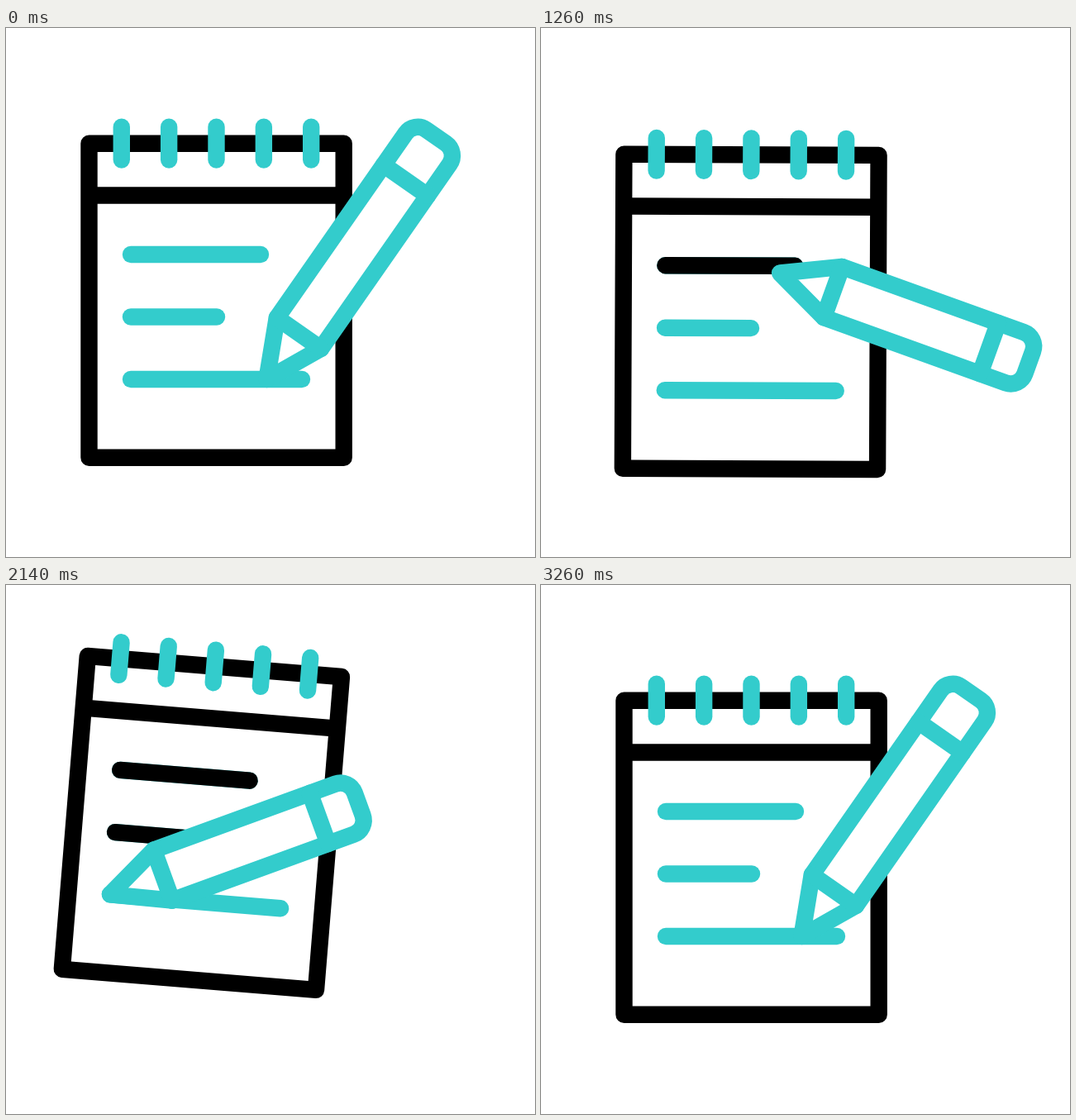
Write an HTML page with a canvas that moves like this. It is 640 by 640 pixels and loops after 3.56 s.

```html
<!DOCTYPE html>
<html lang="en">
<head>
<meta charset="utf-8">
<title>Notepad and pencil</title>
<style>
html, body { margin: 0; width: 100%; height: 100%; overflow: hidden; background: #fff; }
canvas { display: block; width: 100vw; height: 100vh; object-fit: contain; }
</style>
</head>
<body>
<canvas id="stage" width="640" height="640"></canvas>
<script>
const ctx = document.getElementById('stage').getContext('2d');
const LOOP = 3560, START = 212, REST = 3220;
const INK = '#000', TEAL = '#33cccc', RAD = Math.PI / 180;
const PIVOT = { x: 254.5, y: 112.5 }, LEFT = 151;

// The pencil writes each row from left to right, turning as it goes.
const rows = [
  { begin: 605, done: 1210, end: 308, lean: [31.5, 23.7] },
  { begin: 1450, done: 1725, end: 255, lean: [-10, -12.5] },
  { begin: 2145, done: 2711, end: 358, lean: [-20, -44.5] }
];
rows.forEach((row, i) => row.y = 274 + i * 75.5);

const rest = { x: 315.5, y: 425, lean: -55.1 };
const poses = [
  { t: START, ...rest },
  ...rows.flatMap(r => [
    { t: r.begin, x: LEFT, y: r.y, lean: r.lean[0] },
    { t: r.done, x: r.end, y: r.y, lean: r.lean[1] }
  ]),
  { t: REST, ...rest }
];

function ease(t, from, to) {
  const u = Math.min(1, Math.max(0, (t - from) / (to - from)));
  return u * u * (3 - 2 * u);
}

// Moves a value through poses, easing from one to the next.
function follow(list, key, t) {
  return list.slice(1).reduce((v, p, i) =>
    v + (p[key] - list[i][key]) * ease(t, list[i].t, p.t), list[0][key]);
}

// The pad swings to and fro on an even beat and dies out.
function tilt(t) {
  const first = 970, beat = 662, swing = 16.2;
  const beats = [0, 1, 2].map(i => ease(t, first + i * beat, first + (i + 1) * beat));
  return 6.87 * (ease(t, 505, first) - beats[2]) - swing * (beats[0] - beats[1]);
}

// Two hops, with a dip between them.
function lift(t) {
  const hop = 47, dip = 60.7;
  return dip * (ease(t, 675, 1275) - ease(t, 1275, 1995))
    - hop * (ease(t, START, 675) - ease(t, 1995, 2656));
}

function line(x0, y0, x1, y1, color) {
  ctx.strokeStyle = color;
  ctx.beginPath();
  ctx.moveTo(x0, y0);
  ctx.lineTo(x1, y1);
  ctx.stroke();
}

function drawPad(t) {
  ctx.strokeStyle = INK;
  ctx.strokeRect(100.5, 139.7, 308.2, 380.1);
  line(104, 202.5, 405, 202.5, INK);
  for (let i = 0; i < 5; i++) {
    const x = 139.8 + i * 57.35;
    line(x, 119.8, x, 159.5, TEAL);
  }
  for (const { begin, done, end, y } of rows) {
    line(LEFT, y, end, y, TEAL);
    const p = ease(t, begin, done);
    if (p > 0) {
      ctx.globalAlpha = 1 - ease(t, 2900, 3260);
      line(LEFT, y, LEFT + (end - LEFT) * p, y, INK);
      ctx.globalAlpha = 1;
    }
  }
}

function drawPencil(t) {
  // The pencil is a little shorter while it works.
  const k = 1 - ease(t, START, rows[0].begin) + ease(t, rows[2].done, REST);
  const half = 32.5, neck = 68, band = 269 + 24.5 * k, end = 320 + 38 * k;
  ctx.fillStyle = '#fff';
  ctx.strokeStyle = TEAL;
  ctx.beginPath();
  ctx.moveTo(0, 0);
  ctx.lineTo(neck, -half);
  ctx.arcTo(end, -half, end, half, 18);
  ctx.arcTo(end, half, neck, half, 18);
  ctx.lineTo(neck, half);
  ctx.closePath();
  ctx.fill();
  ctx.stroke();
  line(neck, -half, neck, half, TEAL);
  line(band, -half, band, half, TEAL);
}

function drawArc(t) {
  const head = ease(t, 1629, 2029), tail = ease(t, 1700, 2100);
  if (head - tail < 0.002) return;
  ctx.strokeStyle = TEAL;
  ctx.beginPath();
  ctx.arc(PIVOT.x, 322, 281, (135 - 90 * tail) * RAD, (135 - 90 * head) * RAD, true);
  ctx.stroke();
}

function draw(t) {
  ctx.fillStyle = '#fff';
  ctx.fillRect(0, 0, 640, 640);
  ctx.lineWidth = 20.4;
  ctx.lineCap = ctx.lineJoin = 'round';
  drawArc(t);

  const turn = tilt(t) * RAD;
  ctx.save();
  ctx.translate(PIVOT.x, PIVOT.y + lift(t));
  ctx.rotate(turn);
  ctx.translate(-PIVOT.x, -PIVOT.y);
  drawPad(t);
  // The tip rides on the pad, the lean is free of it.
  ctx.translate(follow(poses, 'x', t), follow(poses, 'y', t));
  ctx.rotate(follow(poses, 'lean', t) * RAD - turn);
  drawPencil(t);
  ctx.restore();
}

const start = performance.now();
function tick() {
  draw((performance.now() - start) % LOOP);
  requestAnimationFrame(tick);
}
tick();
</script>
</body>
</html>
```
